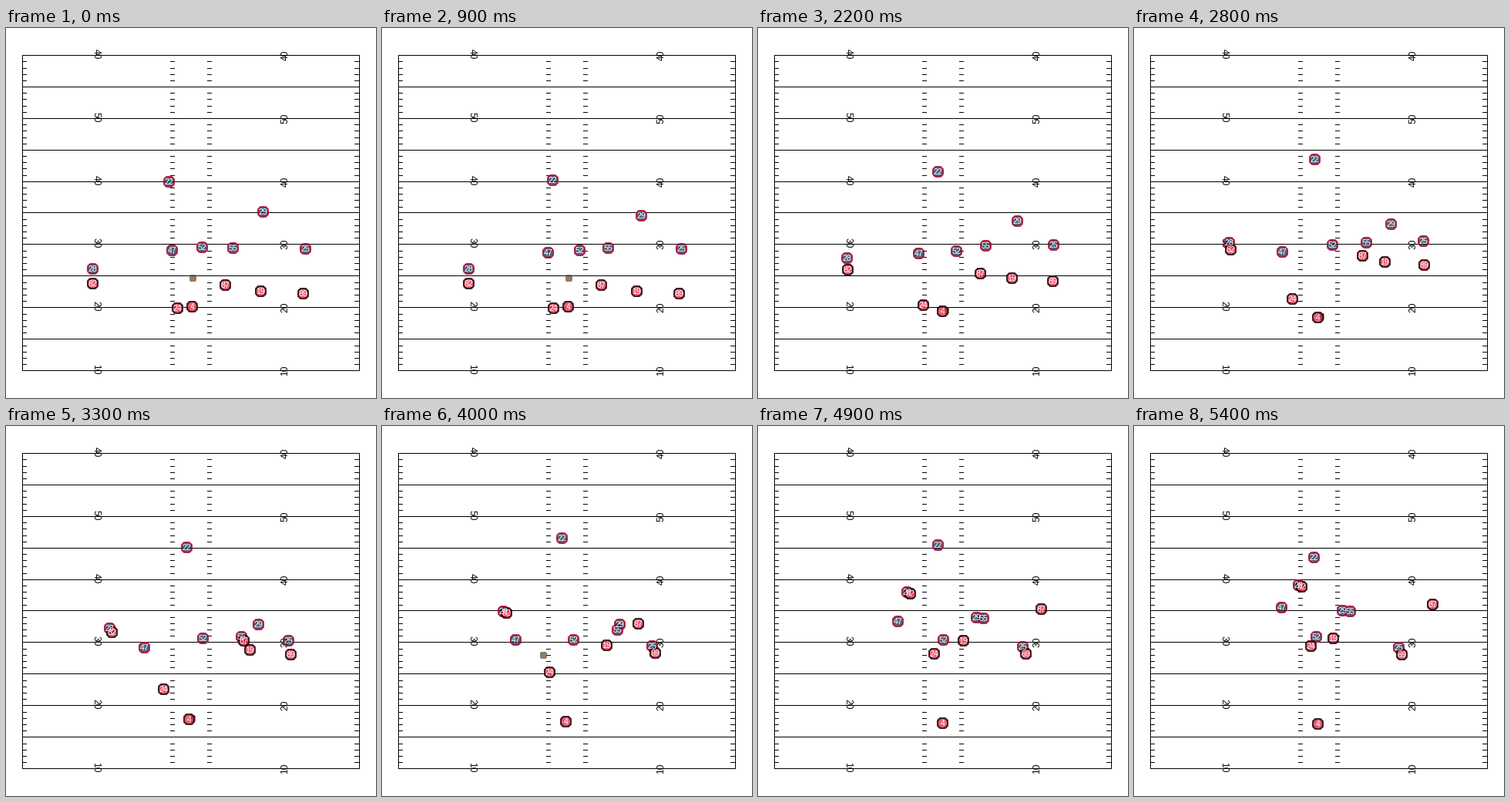
Write a matplotlib script that moves like this. It is 480 px wide and 480 px high and loops after 5500 ms.

```python
import numpy as np
import matplotlib.pyplot as plt
from matplotlib.animation import FuncAnimation
from matplotlib.patches import Circle, Rectangle

SIZE, DPI = 480, 96
PT = 72 / DPI  # points per pixel
FRAMES, STEP = 55, 100

# Moments of the play in ms
SNAP, IN_HAND, THROW, CATCH = 1400, 2000, 3400, 4500
CLOSED, END = 4000, 5400

LEFT, RIGHT, TOP, YARD = 21, 458, 35.4, 8.183
TICK = 6

# Routes: where each player lines up and where he bends, in pixels
RUN_TIMES = [0, SNAP, 3300, CATCH, END]
RUNS = {
    82: [(112, 331), (137, 267), (181, 226), (217, 208)],
    24: [(222, 363), (204, 341), (226, 304), (229, 285)],
    4: [(241, 361), (237, 380), (239, 384), (238, 386)],
    87: [(284, 333), (308, 278), (352, 243), (387, 231)],
    19: [(330, 341), (316, 290), (274, 281), (258, 275)],
    89: [(385, 344), (369, 296), (347, 295), (347, 296)],
}
ZONE_TIMES = [0, 2200, 3300, CATCH, END]
ZONES = {
    47: [(215, 288), (208, 292), (179, 287), (175, 266), (191, 235)],
    22: [(211, 199), (233, 186), (234, 157), (233, 145), (233, 170)],
    52: [(254, 284), (257, 289), (255, 275), (243, 279), (236, 273)],
    55: [(294, 285), (295, 282), (305, 273), (300, 256), (280, 240)],
    29: [(333, 238), (336, 250), (327, 257), (293, 254), (270, 239)],
}
# Man coverage: defender -> (marked runner, gap before the snap, gap when closed)
COVERS = {
    28: (82, (0, -19), (-4, -2)),
    25: (89, (3, -58), (-4, -9)),
}
PASSER, RECEIVER = 4, 82
BALL_SPOT, HAND = np.array([242, 324]), np.array([4, -1])

clock = np.arange(FRAMES) * STEP


def spline(times, points):
    """Smooth path through the points; a part that stands still starts from rest."""
    times, points = np.array(times, float), np.array(points, float)
    h = np.diff(times)[:, None]
    slope = np.diff(points, axis=0) / h
    before, after = slope[:-1], slope[1:]
    inner = (h[1:] * before + h[:-1] * after) / (h[1:] + h[:-1])
    inner[(before == 0) | (after == 0)] = 0
    m = np.vstack([slope[:1], inner, slope[-1:]])
    i = np.clip(np.searchsorted(times, clock, side="right") - 1, 0, len(h) - 1)
    u = (clock - times[i])[:, None] / h[i]
    bend = m[i] * u * (1 - u) ** 2 - m[i + 1] * u * u * (1 - u)
    return points[i] + (points[i + 1] - points[i]) * u * u * (3 - 2 * u) + h[i] * bend


def progress(start, end):
    return np.clip((clock - start) / (end - start), 0, 1)[:, None]


def cover(target, loose, tight):
    u = progress(SNAP, CLOSED)
    loose, tight = np.array(loose), np.array(tight)
    return target + loose + (tight - loose) * u * u * (3 - 2 * u)


def fly(start, end, u):
    return start + (end - start) * u


runs = {n: spline(RUN_TIMES, pts[:1] + pts) for n, pts in RUNS.items()}
defence = {n: spline(ZONE_TIMES, pts) for n, pts in ZONES.items()}
for n, (mark, loose, tight) in COVERS.items():
    defence[n] = cover(runs[mark], loose, tight)

ball_path = fly(BALL_SPOT, runs[PASSER] + HAND, progress(SNAP, IN_HAND))
ball_path = fly(ball_path, runs[RECEIVER][CATCH // STEP], progress(THROW, CATCH))
caught = clock >= CATCH
ball_path[caught] = runs[RECEIVER][caught]

plt.rcParams["font.family"] = "Liberation Sans"
fig = plt.figure(figsize=(SIZE / DPI, SIZE / DPI), dpi=DPI, facecolor="white")
ax = fig.add_axes([0, 0, 1, 1])
ax.set_xlim(0, SIZE)
ax.set_ylim(SIZE, 0)
ax.axis("off")


def bar(x, y, w, h):
    ax.add_patch(Rectangle((x, y), w, h, facecolor="black", lw=0,
                           antialiased=False, zorder=1))


def row(yards, shift=0.0):
    return int(TOP + shift + yards * YARD)


def draw_field():
    style = dict(fontsize=12 * PT, ha="center", va="center", zorder=2)
    for yards in range(51):
        y = row(yards)
        if yards % 5 == 0:
            bar(LEFT, y, RIGHT - LEFT + 1, 1)
        else:
            for x in (LEFT, 213, 261, RIGHT - TICK):
                bar(x, row(yards, 0.28), TICK, 1)
        if yards % 10 == 0:
            label = str(50 - abs(yards - 10))
            ax.text(116.5, y - 1, label, rotation=270, **style)
            ax.text(362.5, y, label, rotation=90, **style)
    for x in (LEFT, RIGHT):
        bar(x, row(0), 1, row(50) - row(0) + 1)


def add_dot(radius, fill, edge, z):
    return ax.add_patch(Circle((0, 0), radius, facecolor=fill, edgecolor=edge,
                               lw=PT, alpha=0.7, antialiased=False, zorder=z))


def add_player(number, path, fill, edge, z):
    text = ax.text(0, 0, str(number), color="white", fontsize=10.6 * PT,
                   ha="center", va="baseline", zorder=6)
    return add_dot(7, fill, edge, z), text, path


draw_field()
ball = add_dot(4.5, "#654321", "none", 3)
players = [add_player(n, p, "#002244", "#c60c30", 4) for n, p in defence.items()]
players += [add_player(n, p, "#e31837", "black", 5) for n, p in runs.items()]


def pixel(point):
    return np.round(point) + 0.5


def update(i):
    ball.center = pixel(ball_path[i])
    for dot, text, path in players:
        x, y = pixel(path[i])
        dot.center = (x, y)
        text.set_position((x, y + 3.5))
    return [ball]


anim = FuncAnimation(fig, update, frames=FRAMES, interval=STEP, repeat=True,
                     repeat_delay=0, blit=False)
plt.show()
```
